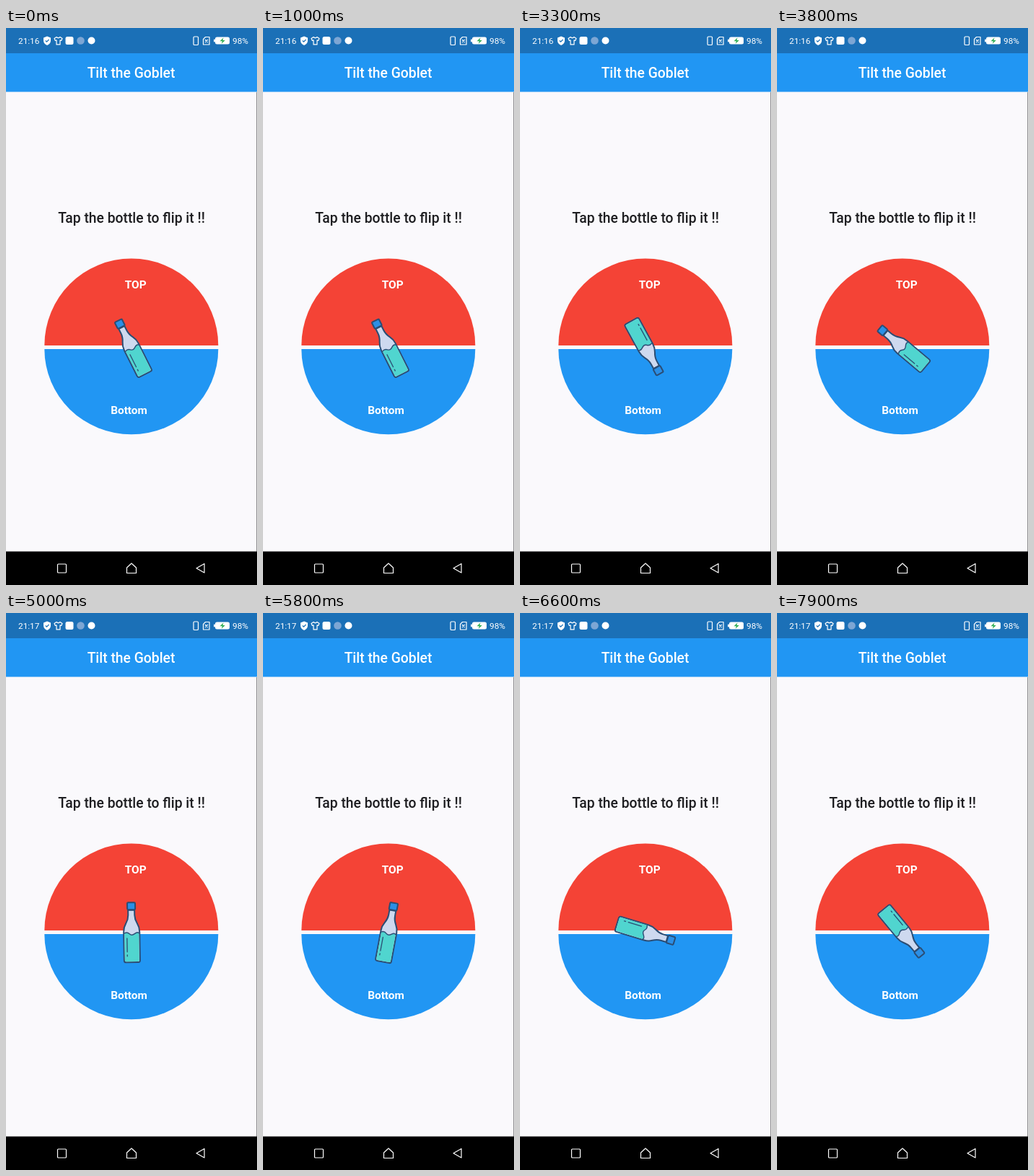
Write an HTML page that moves like this. It is 348 px wide and 772 px high and loops after 8 s.

```html
<!DOCTYPE html>
<html lang="en">
<head>
<meta charset="utf-8">
<title>Tilt the Goblet</title>
<style>
  html, body { margin: 0; width: 100%; height: 100%; overflow: hidden; background: #faf9fc; }
  svg { display: block; width: 100%; height: 100%; }
  text { font-family: Roboto, sans-serif; fill: #fff; }
  .status { font-size: 11.8px; }
  .heading { font-size: 19.3px; font-weight: 500; text-anchor: middle; }
  .label { font-size: 15.4px; font-weight: 700; text-anchor: middle; }
  .line { fill: none; stroke: #fff; stroke-width: 1.2; stroke-linejoin: round; stroke-linecap: round; }
</style>
</head>
<body>
<svg viewBox="0 0 348 772">
  <rect width="348" height="772" fill="#faf9fc"/>
  <path d="M347.5 89V726" stroke="#929295"/>

  <!-- Status bar and title -->
  <rect width="348" height="35.5" fill="#1b70b7"/>
  <rect y="35" width="348" height="53.5" fill="#2196f3"/>
  <text id="clock" class="status" x="17" y="22">21:16</text>
  <path d="M57 11.5l5 2v4q0 4-5 6.500q-5-2.500-5-6.500v-4z" fill="#fff"/>
  <path d="M54.800 17.500l1.700 1.700 3-3.200" fill="none" stroke="#1b70b7" stroke-width="1.200"/>
  <path class="line" d="M70 12.500q2.500 2.500 5 0l3 2-1.300 3-1.700-.6v6h-5v-6l-1.700.6-1.300-3z"/>
  <rect x="82.500" y="12" width="11" height="11" rx="2.500" fill="#fff"/>
  <circle cx="103.500" cy="17.500" r="5.300" fill="#7da6d4"/>
  <circle cx="118.500" cy="17.500" r="5" fill="#fff"/>
  <rect class="line" x="260" y="12" width="6.500" height="11.500" rx="1.300"/>
  <path class="line" d="M276.500 12.500h5.500v10.500h-8.500v-7.500zM276.300 16.500l3 3.200m0-3.200l-3 3.200"/>
  <rect x="290" y="12.500" width="20" height="10" rx="2.500" fill="#fff"/>
  <rect x="288" y="15.500" width="2" height="4" rx="1" fill="#fff"/>
  <path d="M301.500 13.500l-5 4.700h3.300l-1 3.500 5-4.700h-3.300z" fill="#2fae55"/>
  <text class="status" x="314" y="22">98%</text>
  <text class="heading" x="173.500" y="69">Tilt the Goblet</text>

  <text class="heading" x="174" y="269.500" style="fill:#1d1d20">Tap the bottle to flip it !!</text>

  <!-- Split disc -->
  <path d="M53.300 440a120.500 120.500 0 0 1 241 0z" fill="#f44336"/>
  <path d="M53.300 445a120.500 118.300 0 0 0 241 0z" fill="#2196f3"/>
  <text class="label" x="179.700" y="360.500">TOP</text>
  <text class="label" x="170.500" y="534.500">Bottom</text>

  <g id="bottle" stroke="#2b4d74" stroke-width="2" stroke-linejoin="round" stroke-linecap="round">
    <path id="glass" d="M-4.500-31V-24Q-4.500-18-8-12Q-11-7-11-1V39Q-11 41.500-8.500 41.500H8.500Q11 41.500 11 39V-1Q11-7 8-12Q4.500-18 4.500-24V-31z" fill="#ced9ef"/>
    <path d="M-10 1Q-6-1-3 2T4 2T10 1V38.500Q10 40.500 8 40.500H-8Q-10 40.500-10 38.500z" fill="#50d5cf" stroke="none"/>
    <path d="M-10 1Q-6-1-3 2T4 2T10 1" fill="none" stroke-width="1.400"/>
    <path d="M-6.500 8V27M-6.500 31V33" fill="none" stroke-width="1.300"/>
    <rect x="-5.500" y="-41.500" width="11" height="10" rx="1.500" fill="#2b8fe6"/>
  </g>

  <!-- Navigation bar -->
  <rect y="725.500" width="348" height="46.500"/>
  <rect class="line" x="71.500" y="743" width="12" height="12" rx="1"/>
  <path class="line" d="M167.500 748L174 742l6.500 6v7.500h-13z"/>
  <path class="line" d="M264 748.700l11-6.200v12.500z"/>
</svg>
<script>
  const LOOP = 8000;
  const spins = [
    { start: 2740, end: 3955, from: -26.7, to: 359 },
    { start: 5705, end: 6880, from: -1, to: 140.5 }
  ];
  const bottle = document.getElementById("bottle");
  const clock = document.getElementById("clock");

  function angleAt(time) {
    const spin = time < spins[1].start ? spins[0] : spins[1];
    const progress = (time - spin.start) / (spin.end - spin.start);
    return spin.from + (spin.to - spin.from) * Math.min(1, Math.max(0, progress));
  }

  function draw() {
    const time = performance.now() % LOOP;
    bottle.setAttribute("transform", `translate(174.2 442.7) rotate(${angleAt(time)})`);
    clock.textContent = time < 5000 ? "21:16" : "21:17";
    requestAnimationFrame(draw);
  }
  draw();
</script>
</body>
</html>
```
